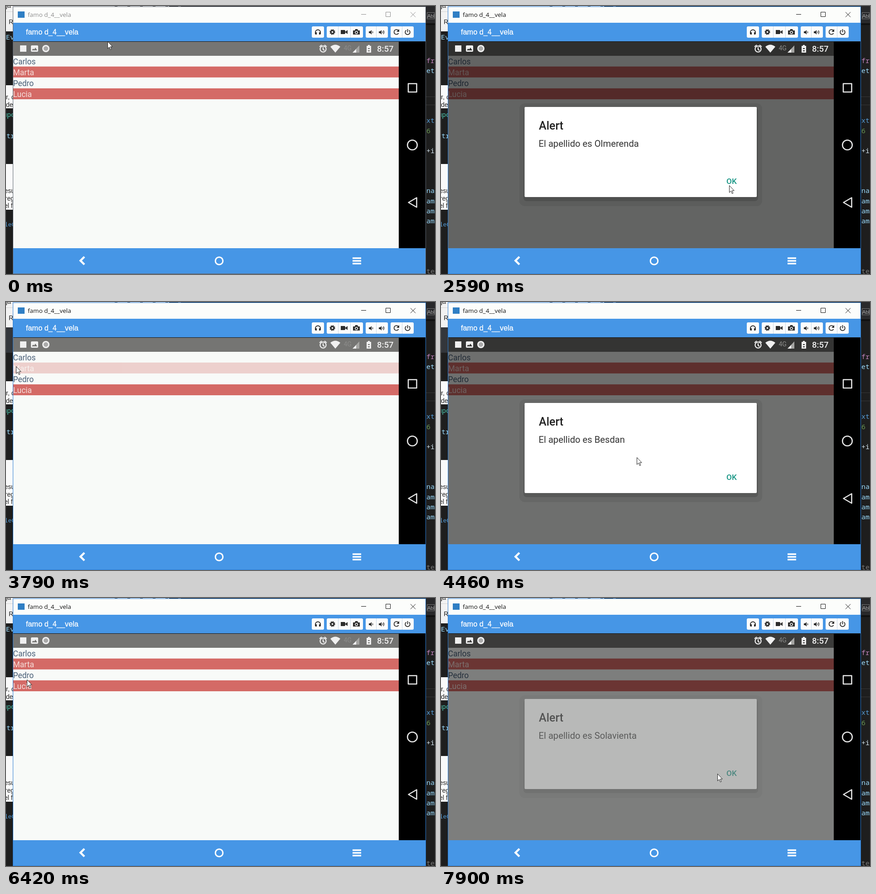
An HTML page that plays this animation: 947x592 px, repeating every 8 s.

```html
<!DOCTYPE html>
<html lang="es">
<head>
<meta charset="utf-8">
<style>
  html, body { margin: 0; width: 100%; height: 100%; overflow: hidden; background: #1e1e1e; }
  svg { display: block; width: 947px; height: 592px; }
  text { white-space: pre; }
  .code { font: 15px "Noto Sans Mono", "DejaVu Sans Mono", monospace; }
  .doc { font: 14px "Liberation Sans", sans-serif; fill: #222; }
  .left { text-anchor: end; }
  .app { font-family: Roboto, sans-serif; }
  .line { fill: none; stroke: #e4e4e4; stroke-width: 2.6; stroke-linejoin: round; }
  .tool { fill: #2d2d2d; }
  .thin { fill: none; stroke: #2d2d2d; stroke-width: 1.8; }
  #title { fill: #8c8c8c; }
  #controls { fill: none; stroke: #8c8c8c; }
  #frame { fill: none; stroke: #5c6470; }
  .active #title { fill: #111; }
  .active #controls { stroke: #111; }
  .active #frame { stroke: #2b7cd3; }
</style>
</head>
<body>
<svg id="stage" viewBox="0 0 947 592">
  <!-- desktop behind the window -->
  <rect width="947" height="592" fill="#1e1e1e"/>
  <rect width="360" height="1" fill="#f4f4f4"/>
  <path d="M240 .5h160" stroke="#777" stroke-dasharray="6 22"/>
  <rect width="16" height="56" fill="#f2f2f2"/>
  <path d="M0 12.5h16" stroke="#d4d4d4"/>
  <text class="doc" x="0" y="4">ja</text>
  <text class="doc" x="6" y="40">R</text>
  <text class="code left" x="18" y="74" fill="#9cdcfe" font-weight="600">nEv</text>
  <rect id="haze" y="56" width="16" height="56" fill="#33363b"/>
  <rect y="175" width="16" height="51" fill="#fafafa"/>
  <text class="doc" x="0" y="206">r, c</text>
  <text class="doc" x="0" y="223">de</text>
  <text class="code left" x="20" y="245" fill="#4ec9b0" font-weight="600">upo</text>
  <text class="code left" x="19" y="292" fill="#9cdcfe" font-weight="600">str</text>
  <rect y="349" width="16" height="101" fill="#fafafa"/>
  <text class="doc left" x="19" y="413">esu</text>
  <text class="doc left" x="18" y="430">reg</text>
  <text class="doc" x="-4" y="446">el fi</text>
  <text class="code left" x="20" y="487" fill="#569cd6" style="font-size:13px">leC</text>

  <rect x="926" width="21" height="42" fill="#29292b"/>
  <path d="M926 40h21" stroke="#111" stroke-width="4"/>
  <rect x="929.5" y="14.5" width="16" height="14" fill="none" stroke="#777"/>
  <text x="930" y="26" font-family="Liberation Sans, sans-serif" font-size="11" fill="#aaa">Abl</text>
  <path d="M926 200.500h21M926 218.500h21" stroke="#383838"/>
  <g class="code" id="editor"></g>
  <path d="M295 591.500h63" stroke="#eee"/>

  <!-- window -->
  <rect x="15" y="1" width="912" height="590" fill="#fcfdfb"/>
  <rect x="26" y="12" width="15" height="14" fill="#2f7fc4"/>
  <text id="title" x="48" y="24" font-family="Open Sans, sans-serif" font-size="13.5">famo d_4__vela</text>
  <path id="controls" d="M784 18.500h11M838.500 13.500h10v10h-10zM893 13.500l11 11M904 13.500l-11 11"/>
  <rect x="16" y="37" width="911" height="41" fill="#4696e6"/>
  <text x="44" y="63" font-family="Liberation Sans, sans-serif" font-size="16.3" fill="#fff" stroke="#fff" stroke-width=".3">famo d_4__vela</text>
  <g fill="#fcfcfc">
    <rect x="675" y="45" width="27" height="25" rx="3"/>
    <rect x="708" y="45" width="80" height="25" rx="3"/>
    <rect x="794" y="45" width="49" height="25" rx="3"/>
    <rect x="849" y="45" width="51" height="25" rx="3"/>
  </g>
  <path d="M733.500 45v25M760.500 45v25M817.500 45v25M874.500 45v25" stroke="#c7d6e4"/>
  <path class="thin" d="M683 59v-1a5.500 5.500 0 0 1 11 0v1"/>
  <path class="tool" d="M682 58h4v5h-2q-2 0-2-2zM691 58h4v3q0 2-2 2h-2z"/>
  <circle class="thin" cx="720.500" cy="57.500" r="3.400" style="stroke-width:3"/>
  <circle class="thin" cx="720.500" cy="57.500" r="5.300" stroke-dasharray="2.080 2.080"/>
  <path class="tool" d="M739 53h8q2 0 2 2v5q0 2-2 2h-8zM749 57l5-4v9l-5-4z"/>
  <path class="tool" fill-rule="evenodd" d="M766 54h4l1-3h5l1 3h4v9h-15zM773.500 55a3.500 3.500 0 1 0 .1 0z"/>
  <circle class="tool" cx="773.500" cy="58.500" r="2"/>
  <path class="tool" d="M801 56h3l3-3v10l-3-3h-3zM823 56h3l3-3v10l-3-3h-3z"/>
  <path class="thin" d="M809 56q1.500 2 0 4M831 56q1.500 2 0 4M833 54q3 4 0 8" style="stroke-width:1.300"/>
  <path class="thin" d="M866 54a5.300 5.300 0 1 0 .5 6"/>
  <path class="tool" d="M868 51v6h-6z"/>
  <path class="thin" d="M883.500 53.500a5.300 5.300 0 1 0 6 0M886.500 51v7"/>

  <!-- phone screen -->
  <rect x="16" y="79" width="851" height="456" fill="#f8faf8"/>
  <rect x="16" y="79" width="851" height="31" fill="#757573"/>
  <g id="rows" class="app" font-size="17.5"></g>
  <rect id="dim" x="16" y="79" width="851" height="456"/>
  <path d="M16 78.500h911" stroke="#151515"/>

  <g fill="#f0f0f0">
    <rect x="31" y="87" width="14" height="14"/>
    <path fill-rule="evenodd" d="M57 87h12q2 0 2 2v10q0 2-2 2h-12q-2 0-2-2v-10q0-2 2-2zM57 98h12l-4-6-3 4-2-2z"/>
    <circle cx="88" cy="94" r="8"/>
    <circle cx="88" cy="94" r="5" fill="#aaa"/>
    <path d="M716 90q11-9 22 0l-11 13z"/>
    <path d="M780 87v16h-15z" fill="#a5a5a3"/>
    <path d="M773 95v8h-8z"/>
    <path fill-rule="evenodd" d="M799 86h4v2h3v15h-10v-15h3zM799 93h4v2h-4zM799 98h4v2h-4z"/>
  </g>
  <g fill="none" stroke="#f0f0f0" stroke-width="2.200">
    <circle cx="700" cy="95" r="6.600"/>
    <path d="M700 91v5l3 2M692 90l5-4M708 90l-5-4"/>
  </g>
  <text class="app" x="745.500" y="98" font-size="14" fill="#8c8c8a">4G</text>
  <text class="app" x="819" y="101" font-size="18.500" font-weight="500" fill="#f0f0f0">8:57</text>

  <g id="dialog" class="app">
    <rect x="173" y="215" width="536" height="227" rx="12" opacity=".07"/>
    <rect x="182" y="224" width="518" height="207" rx="7" opacity=".14"/>
    <rect x="184.500" y="223" width="512.500" height="199" rx="2" fill="#fff"/>
    <text x="216" y="273" font-size="25" font-weight="500" fill="#222">Alert</text>
    <text id="message" x="215.500" y="311" font-size="20.200" fill="#333"></text>
    <text x="630" y="393" font-size="17.300" font-weight="500" fill="#169584">OK</text>
  </g>

  <!-- phone keys and bottom bar -->
  <rect x="867" y="79" width="60" height="456"/>
  <rect class="line" x="888" y="171.500" width="18.500" height="18.500"/>
  <circle class="line" cx="897" cy="307" r="10.800"/>
  <path class="line" d="M906.500 423.500v21l-18-10.500z"/>
  <rect x="16" y="535" width="911" height="56" fill="#4696e6"/>
  <g fill="none" stroke="#fff">
    <path d="M173 554l-8.500 8.500 8.500 8.500" stroke-width="4.500"/>
    <circle cx="470.500" cy="563" r="8.300" stroke-width="3"/>
    <path d="M765 557h19M765 563h19M765 569h19" stroke-width="3.400"/>
  </g>
  <rect id="frame" x="15.500" y="1.500" width="911" height="590"/>

  <path id="cursor" d="M.5.5v15.500l3.600-3.300 2.500 5.800 2.300-1-2.500-5.600h4.800z" fill="#fff" stroke="#222"/>
</svg>
<script>
const LOOP = 8000;
const SVG = "http://www.w3.org/2000/svg";
const $ = id => document.getElementById(id);

function add(parent, tag, attrs, text = "") {
  const node = document.createElementNS(SVG, tag);
  for (const key in attrs) node.setAttribute(key, attrs[key]);
  node.textContent = text;
  parent.append(node);
  return node;
}

// Code to the right of the window, one entry per line
const tints = { fr: "#c586c0", xt: "#569cd6", 6: "#6a9955", "+i": "#d4e4ee", te: "#777" };
"fr,et,,,,,xt,6,,+i,,,,na,am,am,am,,,,,te".split(",").forEach((text, i) =>
  add($("editor"), "text", { x: 928, y: 125.5 + i * 22.15, fill: tints[text] || "#9cdcfe" }, text));

const rows = ["Carlos", "Marta", "Pedro", "Lucia"].map((name, i) => {
  const row = add($("rows"), "g", {});
  const y = 109.6 + i * 24.1;
  if (i % 2) add(row, "rect", { x: 16, y, width: 851, height: 24.1, fill: "#d46a66" });
  add(row, "text", { x: 15.5, y: y + 19, fill: i % 2 ? "#f5dedb" : "#4a6078" }, name);
  return row;
});

// Each tap dims its row, then opens an alert until OK is hit
const alerts = [
  { name: "Olmerenda", open: 1670, close: 2683 },
  { name: "Besdan", open: 4185, close: 5040 },
  { name: "Solavienta", open: 7000, close: 7863 }
];

// Where the pointer rests, and when it arrives and leaves
const stops = [
  { x: 224, y: 78, arrive: 0, leave: 0 },
  { x: 41, y: 122, arrive: 1050, leave: alerts[0].open },
  { x: 636, y: 396, arrive: 2080, leave: 2826 },
  { x: 22, y: 142, arrive: 3490, leave: alerts[1].open },
  { x: 636, y: 385, arrive: 4740, leave: 5057 },
  { x: 811, y: 371, arrive: 5640, leave: 5760 },
  { x: 46, y: 180, arrive: 6420, leave: alerts[2].open },
  { x: 610, y: 388, arrive: 7630, leave: LOOP }
];
const SAG = 45;

const ramp = (t, start, length) => Math.min(1, Math.max(0, (t - start) / length));

function pointerAt(t) {
  const i = stops.findIndex(stop => t < stop.arrive);
  if (i < 0) return stops[stops.length - 1];
  const a = stops[i - 1], b = stops[i];
  const p = 1 - (1 - ramp(t, a.leave, b.arrive - a.leave)) ** 1.6;
  return { x: a.x + (b.x - a.x) * p, y: a.y + (b.y - a.y) * p + SAG * Math.sin(Math.PI * p) };
}

function draw() {
  const t = performance.now() % LOOP;
  const { x, y } = pointerAt(t);
  $("cursor").setAttribute("transform", `translate(${Math.round(x)} ${Math.round(y)})`);
  $("stage").classList.toggle("active", t >= 1170);
  $("haze").style.opacity = t >= 3090 && t < 5000 ? 1 : 0;

  let dim = 0, shown = 0;
  alerts.forEach(({ name, open, close }, i) => {
    rows[i].style.opacity = 1 - 0.8 * ramp(t, open - 500, 120) * (1 - ramp(t, open - 150, 250));
    dim += 0.6 * ramp(t, open, 300) * (1 - ramp(t, close, 220));
    shown += ramp(t, open, 200) * (1 - ramp(t, close, 70));
    if (t >= open) $("message").textContent = "El apellido es " + name;
  });
  $("dim").style.opacity = dim;
  $("dialog").style.opacity = shown;
  requestAnimationFrame(draw);
}
draw();
</script>
</body>
</html>
```
